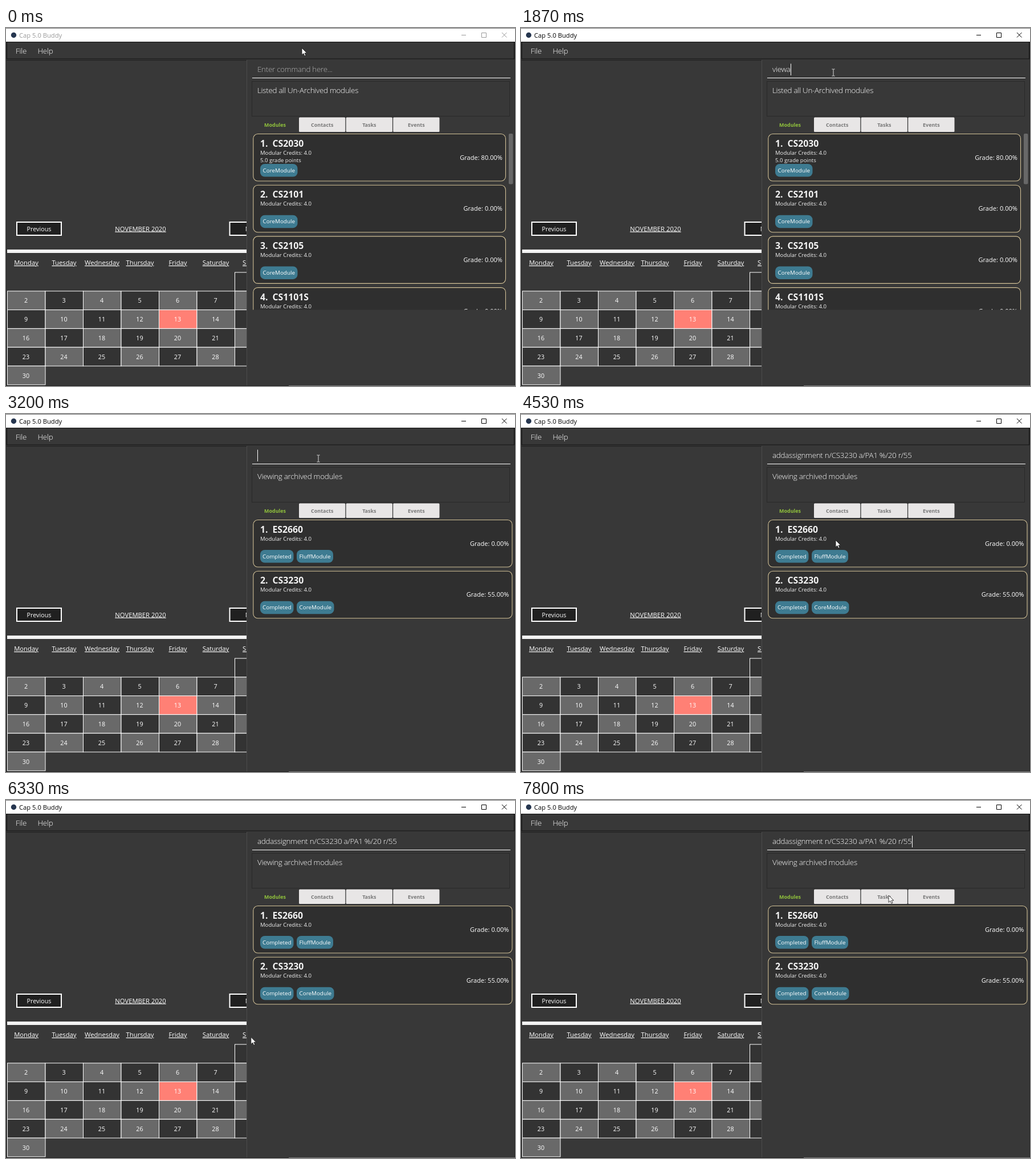
Recreate the animation shown at these times as an HTML page. Size 893x627 px, loop 8 s.

```html
<!DOCTYPE html>
<html lang="en">
<head>
<meta charset="utf-8">
<title>Module planner</title>
<style>
  html, body { margin: 0; width: 100%; height: 100%; overflow: hidden; background: #383838; }
  svg { display: block; width: 893px; height: 627px; }
  text { font-family: "Open Sans", "Noto Sans", sans-serif; fill: #fff; }
  .light { font-weight: 300; font-size: 13.4px; letter-spacing: -.27px; }
  .title { font-size: 11.2px; }
  .head { font-size: 15.8px; font-weight: 700; fill: #f2f2f2; }
  .small { font-size: 9.55px; fill: #f2f2f2; }
  .grade { font-size: 11.1px; text-anchor: end; }
  .tag { font-size: 9.85px; }
  .tab { font-size: 8.95px; font-weight: 700; text-anchor: middle; }
  .day { font-size: 11.25px; text-anchor: middle; text-decoration: underline; }
  .num { font-size: 10.8px; text-anchor: middle; }
</style>
</head>
<body>
<svg id="stage" viewBox="0 0 893 627"></svg>
<script>
const LOOP = 8000, TICK = 200 / 3;

const el = (tag, attrs, body = "") =>
  `<${tag} ${Object.entries(attrs).map(([k, v]) => `${k}="${v}"`).join(" ")}>${body}</${tag}>`;
const text = (x, y, cls, body, more = {}) => el("text", { x, y, class: cls, ...more }, body);
const rect = (x, y, width, height, fill, more = {}) =>
  el("rect", { x, y, width, height, fill, ...more });
const path = (d, stroke, more = {}) => el("path", { d, stroke, fill: "none", ...more });

function windowFrame() {
  return rect(0, 0, 893, 627, "#383838") +
    rect(0, 0, 893, 24, "#fff") +
    path("M0 .5H893", "#777") +
    el("circle", { cx: 13.5, cy: 12.5, r: 4.7, fill: "#26364f" }) +
    text(23, 16.5, "title", "Cap 5.0 Buddy", { id: "title" }) +
    path("M799 12.5h8M834.5 8.5h8v8h-8zM870 8l8.5 8.5M878.5 8l-8.5 8.5", "#000", { id: "controls" }) +
    rect(1.5, 24.5, 890, 29.5, "#383838", { stroke: "#151515" }) +
    text(17, 45, "light", "File") + text(55.5, 45, "light", "Help") +
    path("M1 56.5H422M.5 24V627M892.5 24V627", "#202020") +
    path("M422.5 56V627", "#4b4b4b") +
    path("M0 626.5H496", "#202020") + path("M496 626.5H893", "#777");
}

function calendar() {
  const columnX = i => 2.5 + i * 66.5;
  const button = (x, label) =>
    rect(x + 1, 340, 78, 23, "#202020", { stroke: "#fff", "stroke-width": 2 }) +
    text(x + 40, 355.5, "num", label);
  const names = ["Monday", "Tuesday", "Wednesday", "Thursday", "Friday", "Saturday", "Sunday"];
  let out = button(18, "Previous") + button(391.5, "Next") +
    text(236, 355.5, "day", "NOVEMBER 2020") +
    rect(2, 388, 420, 6, "#f4f4f4");
  names.forEach((name, i) => out += text(columnX(i) + 33, 415, "day", name));
  for (let day = 1; day <= 30; day++) {
    const slot = day + 5, x = columnX(slot % 7), y = 428 + Math.floor(slot / 7) * 32.8;
    const fill = day === 13 ? "#ff8075" : day % 2 ? "#333" : "#696969";
    out += rect(x, y, 66.5, 32.8, fill, { stroke: "#fff" }) +
      text(x + 32.5, y + 20.5, "num", day);
  }
  return el("g", { "clip-path": "url(#leftPane)" }, out);
}

function tabs() {
  return text(472, 173, "tab", "Modules", { style: "fill:#91c43c" }) +
    ["Contacts", "Tasks", "Events"].map((name, i) => {
      const x = 514 + i * 82.6;
      return rect(x, 156.5, 81.3, 25.5, "#e8e6e6", { rx: 1.5 }) +
        text(x + 40.7, 173, "tab", name, { style: "fill:#777" });
    }).join("");
}

function card(index, width, { code, grade, tags, points = "" }) {
  const y = 185.5 + index * 89.7;
  let x = 446;
  const chips = tags.map(([label, w]) => {
    const chip = rect(x, y + 52.5, w, 22.5, "#3e7b91", { rx: 8 }) +
      text(x + w / 2, y + 67.2, "tag", label, { "text-anchor": "middle" });
    x += w + 5.5;
    return chip;
  }).join("");
  return rect(433.8, y, width, 82.5, "#2f2f2f", { rx: 8, stroke: "#d2c197", "stroke-width": 1.1 }) +
    text(446, y + 22, "head", `${index + 1}.`) + text(467.5, y + 22, "head", code) +
    text(446, y + 36, "small", "Modular Credits: 4.0") +
    text(446, y + 49.3, "small", points) +
    text(433.8 + width - 5.5, y + 45.2, "grade", `Grade: ${grade}%`) + chips;
}

const core = ["CoreModule", 65.5], fluff = ["FluffModule", 64], done = ["Completed", 58.5];
const current = [
  { code: "CS2030", grade: "80.00", tags: [core], points: "5.0 grade points" },
  { code: "CS2101", grade: "0.00", tags: [core] },
  { code: "CS2105", grade: "0.00", tags: [core] },
  { code: "CS1101S", grade: "0.00", tags: [core] }
];
const archived = [
  { code: "ES2660", grade: "0.00", tags: [done, fluff] },
  { code: "CS3230", grade: "55.00", tags: [done, core] }
];
const list = (id, items, width, extra = "") => el("g", { id, "clip-path": "url(#listPane)" },
  items.map((item, i) => card(i, width, item)).join("") + extra);

const stage = document.getElementById("stage");
stage.innerHTML =
  el("clipPath", { id: "leftPane" }, rect(0, 0, 422, 627, "#000")) +
  el("clipPath", { id: "listPane" }, rect(424, 184, 469, 309.5, "#000")) +
  windowFrame() + calendar() +
  path("M432 87.5H885", "#fff") +
  rect(431.5, 93.5, 452, 61, "#383838", { stroke: "#292929" }) +
  text(441, 77.3, "light", "", { id: "command" }) +
  path("M0 62.5V83", "#fff", { id: "caret" }) +
  text(441, 113.8, "light", "", { id: "result" }) + tabs() +
  list("current", current, 442.7, rect(882, 185, 7.5, 88.5, "#686868", { rx: 2 })) +
  list("archived", archived, 454.2) +
  path("M0 0V12.3L2.9 9.6L4.9 14.1L7 13.2L5 8.9H8.9Z", "#111",
    { id: "arrow", style: "fill:#fff", "stroke-width": .8 }) +
  path("M-2.5 -6H-.5L0 -5.5L.5 -6H2.5M0 -5.5V5.5M-2.5 6H-.5L0 5.5L.5 6H2.5", "#ddd", { id: "beam" });

const ui = Object.fromEntries([...stage.querySelectorAll("[id]")].map(node => [node.id, node]));
const show = (node, on) => node.setAttribute("visibility", on ? "visible" : "hidden");

const FOCUS = 530, ENTER = 3200, PASTE = 4070;
const word = "viewarchive";
const keyTimes = [1270, 1330, 1470, 1730, 1870, 2600, 2800, 2870, 2930, 3000, 3070];
const caretFlips = [FOCUS, 1070, 1270, 2400, 2600, 3730, PASTE, 4530, 5070, 5530, 5600,
  6070, 6600, 7130, 7600];

// Pointer stops: time, x, y
const route = [
  [0, 519, 35], [200, 528, 47], [400, 541, 65], [530, 548, 78], [4270, 548, 78],
  [4400, 550, 145], [4530, 552, 221], [5270, 552, 221], [5670, 623, 204], [5940, 623, 204],
  [6140, 736, 235], [6300, 500, 424], [6470, 142, 380], [6630, 300, 300], [6800, 587, 291],
  [6930, 788, 340], [7130, 480, 438], [7330, 16, 375], [7500, 310, 240], [7670, 645, 167],
  [LOOP, 645, 167]
];

function pointerAt(t) {
  const i = route.findIndex(stop => stop[0] > t);
  const [t0, x0, y0] = route[i - 1], [t1, x1, y1] = route[i];
  const k = (t - t0) / (t1 - t0);
  return [x0 + (x1 - x0) * k, y0 + (y1 - y0) * k];
}

function commandAt(t) {
  if (t < FOCUS) return "Enter command here...";
  if (t >= PASTE) return "addassignment n/CS3230 a/PA1 %/20 r/55";
  return t < ENTER ? word.slice(0, keyTimes.filter(key => key <= t).length) : "";
}

function draw(now) {
  const t = now % LOOP, focused = t >= FOCUS, entered = t >= ENTER;
  const ink = focused ? "#000" : "#999";
  ui.title.style.fill = ink;
  ui.controls.style.stroke = ink;

  ui.command.textContent = commandAt(t);
  ui.command.style.fill = focused ? "#fff" : "#b0b0b0";
  const caretX = 441.5 + Math.round(ui.command.getComputedTextLength());
  ui.caret.setAttribute("transform", `translate(${caretX} 0)`);
  show(ui.caret, caretFlips.filter(flip => flip <= t).length % 2);

  ui.result.textContent = entered ? "Viewing archived modules" : "Listed all Un-Archived modules";
  show(ui.current, !entered);
  show(ui.archived, entered);

  const [x, y] = pointerAt(Math.floor((t + 4) / TICK) * TICK % LOOP);
  const overField = x > 432 && y > 58 && y < 88;
  for (const node of [ui.arrow, ui.beam]) node.setAttribute("transform", `translate(${x} ${y})`);
  show(ui.arrow, !overField);
  show(ui.beam, overField);
}

const start = performance.now();
function frame() {
  draw(performance.now() - start);
  requestAnimationFrame(frame);
}
frame();
</script>
</body>
</html>
```
